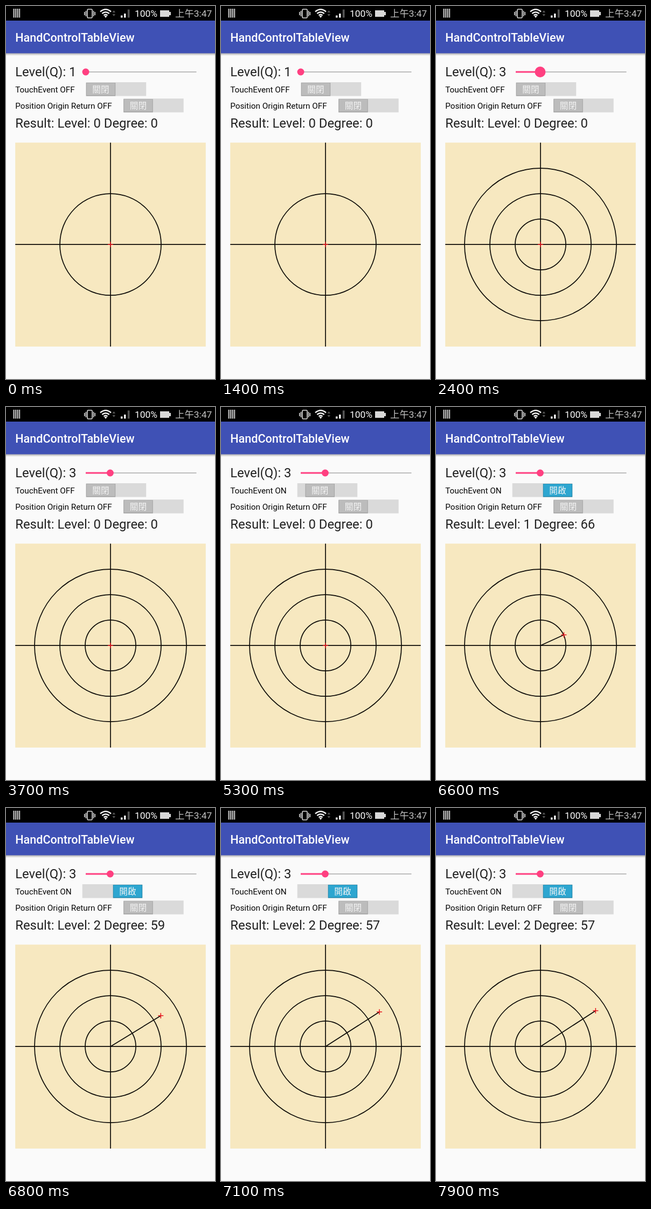
These frames come from a looping animation (388 px wide and 690 px high, 8000 ms). An HTML page:

```html
<!DOCTYPE html>
<html lang="zh-Hant">
<head>
<meta charset="utf-8">
<title>HandControlTableView</title>
<style>
html, body { margin: 0; width: 100%; height: 100%; overflow: hidden; background: #fafafa; }
svg { display: block; width: 100vw; height: 100vh; }
text { font-family: Roboto, "Noto Sans CJK TC", "Noto Sans CJK", sans-serif; white-space: pre; }
.big { font-size: 23.9px; fill: #212121; }
.small { font-size: 15.3px; fill: #050505; }
.bar { font-size: 17.4px; }
.key { font-size: 15.6px; fill: #f4f4f4; text-anchor: middle; }
.ink { fill: none; stroke: #0c0a06; stroke-width: 1.7; }
</style>
</head>
<body>
<svg viewBox="0 0 388 690" preserveAspectRatio="none">
  <defs>
    <linearGradient id="shade" x2="0" y2="1">
      <stop offset="0" stop-color="#000" stop-opacity=".3"/>
      <stop offset="1" stop-color="#000" stop-opacity="0"/>
    </linearGradient>
  </defs>
  <rect width="388" height="690" fill="#fafafa"/>

  <!-- status bar -->
  <rect width="388" height="27" fill="#000"/>
  <path d="M14.5 5V21.5M18 5V21.5M21.5 5V21.5M25 5V21.5" stroke="#b4b4b4" stroke-width="2.4"/>
  <g fill="none" stroke="#ddd" stroke-width="1.6">
    <rect x="151" y="6" width="9" height="16" rx="1.5"/>
    <path d="M148.5 9V19M145.8 11V17M162.5 9V19M165.2 11V17"/>
  </g>
  <g fill="none" stroke="#f2f2f2" stroke-width="2.4">
    <path d="M175 10.5Q185 2 195 10.5M178.3 14Q185 8.3 191.7 14M181.5 17.3Q185 14.3 188.5 17.3"/>
  </g>
  <path d="M182.5 18.8Q185 16.8 187.5 18.8L185 22Z" fill="#f2f2f2"/>
  <path d="M197.5 12L200.3 8L203 12ZM197.5 15L200.3 19L203 15Z" fill="#555"/>
  <path d="M213 17.5H216.5V21.5H213ZM219 14H222.5V21.5H219Z" fill="#f2f2f2"/>
  <path d="M225.8 6.5H229.5V21.5H225.8Z" fill="#555"/>
  <text class="bar" x="239" y="20" fill="#fff">100%</text>
  <path d="M286 8H303V11H306V17H303V20H286Z" fill="#d8d8d8"/>
  <text class="bar" x="314" y="20" fill="#c4c4c4">上午3:47</text>

  <!-- app bar -->
  <rect y="27" width="388" height="60.5" fill="#3f51b5"/>
  <rect y="87.5" width="388" height="4.5" fill="url(#shade)"/>
  <text x="17.2" y="66" font-size="21.6" font-weight="500" fill="#fff">HandControlTableView</text>

  <!-- controls -->
  <text class="big" id="level" x="17.2" y="130"></text>
  <path d="M148 122H353.5" stroke="#a9a9a9" stroke-width="1.4"/>
  <path id="fill" stroke="#ff4081" stroke-width="3"/>
  <circle id="knob" cy="122" fill="#ff4081"/>
  <text class="small" id="touch" x="17.2" y="160"></text>
  <g id="touchSwitch"></g>
  <text class="small" x="17.2" y="190">Position Origin Return OFF</text>
  <g id="returnSwitch"></g>
  <text class="big" id="result" x="17.2" y="225"></text>

  <!-- table -->
  <rect x="17.2" y="252.7" width="353.6" height="377.3" fill="#f7e8c0"/>
  <g id="rings" class="ink"></g>
  <path class="ink" d="M194 252.7V630M17.2 441.2H370.8"/>
  <path class="ink" id="ray"/>
  <path id="cross" d="M-5 0H5M0 -5V5" stroke="#e8141e" stroke-width="1.5"/>
</svg>
<script>
const LOOP = 8000, STEP = 100;
const CX = 194, CY = 441.2, REACH = 188;
// pointer drag: time, x, y
const drag = [[6400, CX, CY], [6600, 237.4, 421.6], [6800, 287.3, 384.3], [7400, 296.3, 375]];

const $ = id => document.getElementById(id);
const clamp = v => Math.max(0, Math.min(1, v));
const span = (t, a, b) => clamp((t - a) / (b - a));
const smooth = p => p * p * (3 - 2 * p);
const mix = (a, b, p) => a + (b - a) * p;

function pointer(t) {
  let [, x, y] = drag[0];
  for (let i = 1; i < drag.length; i++) {
    const [t0, x0, y0] = drag[i - 1], [t1, x1, y1] = drag[i];
    if (t < t0) break;
    let p = span(t, t0, t1);
    if (i === drag.length - 1) p = 1 - (1 - p) ** 2;
    x = mix(x0, x1, p);
    y = mix(y0, y1, p);
  }
  return { x, y };
}

function toggle(x, y, pos) {
  const on = pos > 0.5, left = x + 57 * pos;
  return `<rect x="${x}" y="${y}" width="111.5" height="25.5" fill="#dadada"/>
    <rect x="${left}" y="${y + 1}" width="54.5" height="24.5" fill="${on ? '#2287ab' : '#a2a2a2'}"/>
    <rect x="${left + 1}" y="${y + 1.5}" width="52.5" height="22.5" fill="${on ? '#2da6d0' : '#bcbcbc'}"/>
    <text class="key" x="${left + 27.2}" y="${y + 18.8}">${on ? '開啟' : '關閉'}</text>`;
}

function draw(t) {
  const q = t < 2400 ? 1 : 3;
  const gap = REACH / (q + 1);
  const knobX = 148 + (q - 1) * 22.7;
  const press = q > 1 ? 1 - smooth(span(t, 2500, 2900)) : 0;
  $('level').textContent = `Level(Q): ${q}`;
  $('fill').setAttribute('d', `M148 122H${knobX}`);
  $('knob').setAttribute('cx', knobX);
  $('knob').setAttribute('r', mix(6.5, 10, press));

  const on = t >= 5300;
  $('touch').textContent = `TouchEvent ${on ? 'ON' : 'OFF'}`;
  $('touchSwitch').innerHTML = toggle(on ? 141.7 : 148.7, 141, smooth(span(t, 5200, 5500)));

  let rings = '';
  for (let i = 1; i <= q; i++) rings += `<circle cx="${CX}" cy="${CY}" r="${gap * i}"/>`;
  $('rings').innerHTML = rings;

  const { x, y } = pointer(t), dx = x - CX, dy = CY - y;
  const level = Math.floor(Math.hypot(dx, dy) / gap);
  const degree = Math.round(Math.atan2(dx, dy) * 180 / Math.PI);
  $('result').textContent = `Result: Level: ${level} Degree: ${degree}`;
  $('ray').setAttribute('d', `M${CX} ${CY}L${x} ${y}`);
  $('cross').setAttribute('transform', `translate(${x} ${y})`);
}

$('returnSwitch').innerHTML = toggle(218.2, 171.2, 0);
const start = performance.now();
let last = -1;
function tick() {
  const t = Math.floor((performance.now() - start) % LOOP / STEP) * STEP;
  if (t !== last) draw(last = t);
  requestAnimationFrame(tick);
}
tick();
</script>
</body>
</html>
```
